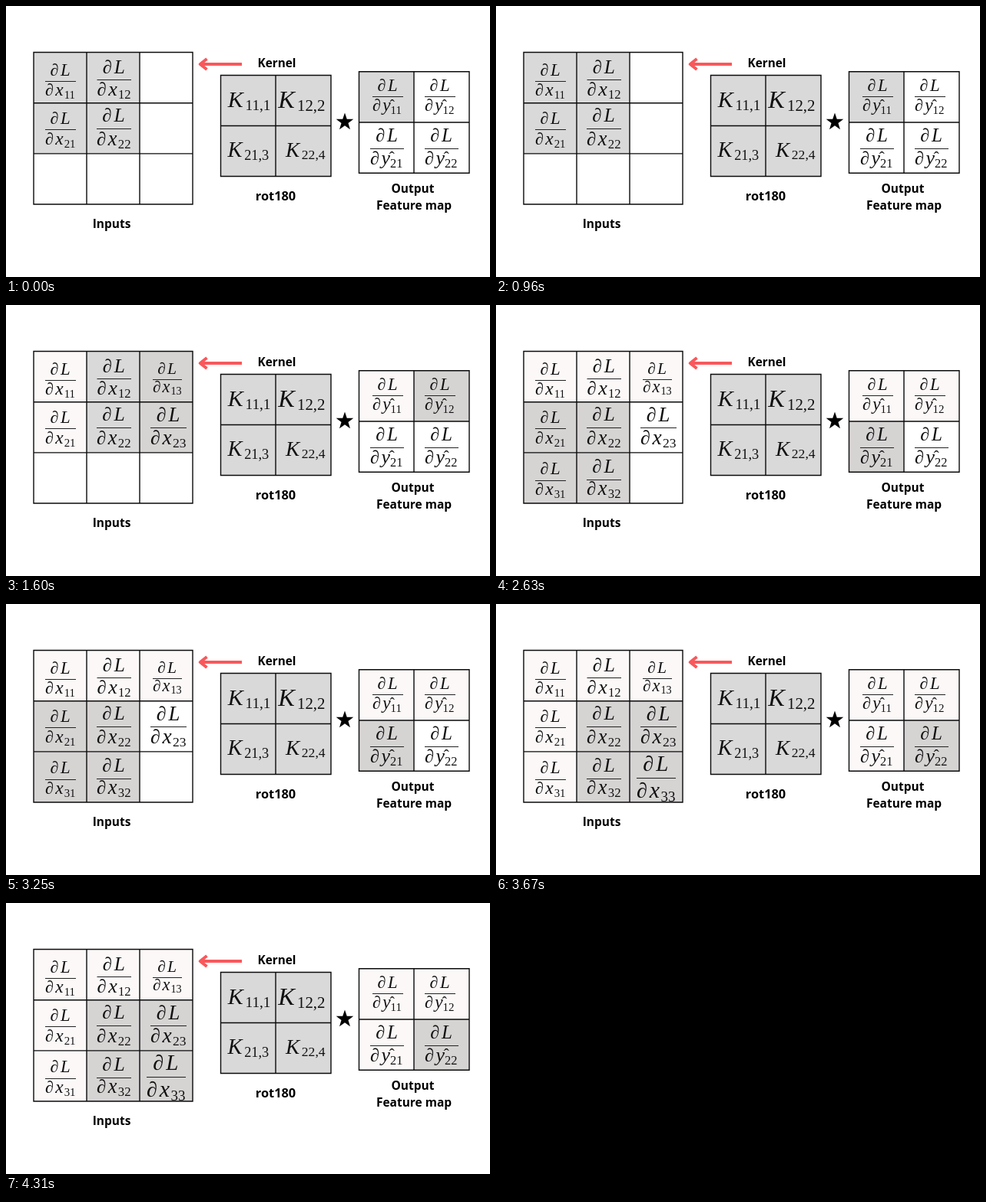
Write an HTML page that moves like this. It is 630 by 354 pixels and loops after 4730 ms.

```html
<!DOCTYPE html>
<html lang="en">
<head>
<meta charset="utf-8">
<title>Convolution gradient</title>
<style>
html, body { margin: 0; width: 100%; height: 100%; overflow: hidden; background: #fff; }
svg { display: block; width: 630px; height: 354px; }
.label { font-family: "Open Sans", "Noto Sans", sans-serif; font-weight: 700; text-anchor: middle; }
.it { font-family: "Liberation Serif", "Times New Roman", serif; font-style: italic; fill: #111; }
.up { font-family: "Liberation Serif", "Times New Roman", serif; fill: #111; }
</style>
</head>
<body>
<svg id="stage" viewBox="0 0 630 354"></svg>
<script>
const NS = 'http://www.w3.org/2000/svg';
const stage = document.getElementById('stage');
const LOOP = 4730;
const STARTS = [0, 1600, 2630, 3670];
const TONES = { w: '#ffffff', o: '#fcf8f8', g: '#d9d9d9', d: '#d6d3d3' };

// Cell tones per step, row by row
const INPUT_STEPS = ['ggwggwwww', 'ogdogdwww', 'oooddwddw', 'ooooddodd'];
const OUTPUT_STEPS = ['gwww', 'odww', 'oodw', 'oood'];

function add(parent, tag, attrs, text) {
  const el = document.createElementNS(NS, tag);
  for (const k in attrs) el.setAttribute(k, attrs[k]);
  if (text) el.textContent = text;
  parent.appendChild(el);
  return el;
}

const glyph = (parent, cls, x, y, size, text) =>
  add(parent, 'text', { class: cls, x, y, 'font-size': size }, text);

// Filled cells first, ruled lines on top
function grid(xs, ys) {
  const cells = [];
  for (let r = 0; r < ys.length - 1; r++)
    for (let c = 0; c < xs.length - 1; c++)
      cells.push(add(stage, 'rect', {
        x: xs[c], y: ys[r], width: xs[c + 1] - xs[c], height: ys[r + 1] - ys[r], fill: TONES.g
      }));
  const x1 = xs[xs.length - 1], y1 = ys[ys.length - 1];
  const d = xs.map(x => `M${x} ${ys[0]}V${y1}`).concat(ys.map(y => `M${xs[0]} ${y}H${x1}`)).join('');
  add(stage, 'path', { d, stroke: '#0a0a0a', 'stroke-width': 1.4, 'stroke-linecap': 'square', fill: 'none' });
  return cells;
}

// Partial derivative of L; the bar width sets the type size
function fraction(left, right, top, bar, bottom, name, sub) {
  const g = add(stage, 'g', {});
  const s = (right - left) / 1.88;
  const x = (left + right) / 2 - 0.635 * s;
  glyph(g, 'it', x, top, s * 1.04, '∂');
  glyph(g, 'it', x + 0.63 * s, top, s * 1.07, 'L');
  add(g, 'path', { d: `M${left} ${bar}H${right}`, stroke: '#222', 'stroke-width': 1 });
  glyph(g, 'it', left, bottom, s * 1.04, '∂');
  glyph(g, 'it', left + 0.62 * s, bottom, s * 1.1, name);
  const hat = name === 'y';
  if (hat) glyph(g, 'up', left + 1.06 * s, bottom - 0.1 * s, s * 0.9, 'ˆ');
  glyph(g, 'up', left + (hat ? 1.11 : 1.16) * s, bottom + 0.17 * s, s * 0.7, sub);
  return g;
}

function weight(x, y, s, sub) {
  glyph(stage, 'it', x + 0.06 * s, y, s * 1.1, 'K');
  glyph(stage, 'up', x + 0.9 * s, y + 0.16 * s, s * 0.71, sub);
}

function label(x, y, text, size = 15.5) {
  add(stage, 'text', { class: 'label', x, y, 'font-size': size }, text);
}

const inputs = grid([36, 105, 174, 243], [60.5, 126.7, 192.9, 259]);
grid([279.5, 351, 423], [90.5, 156.5, 222.5]);
const outputs = grid([459.5, 531, 603], [85.8, 152, 218.2]);

// left, right, numerator, bar, denominator, index, first step shown
const terms = [
  [51, 91, 91, 98.5, 117, '11', 0],
  [118.5, 163, 88, 96.5, 117, '12', 0],
  [191, 229, 89.5, 97.5, 114, '13', 1],
  [51, 91, 154, 161.5, 181, '21', 0],
  [118, 163, 151, 160.5, 182, '22', 0],
  [188, 235, 152, 160.5, 182, '23', 1],
  [51, 91, 221, 229.5, 248, '31', 2],
  [118, 163, 218.5, 228.5, 248, '32', 2],
  [183, 234, 218, 227.5, 253, '33', 3]
].map(([l, r, t, b, d, sub, from]) => ({ el: fraction(l, r, t, b, d, 'x', sub), from }));

[
  [477, 517, 111, 118.5, 137, '11'],
  [545, 585, 111, 118.5, 137, '12'],
  [474, 518, 177, 186.5, 207, '21'],
  [545, 589, 177, 186.5, 207, '22']
].forEach(([l, r, t, b, d, sub]) => fraction(l, r, t, b, d, 'y', sub));

weight(287, 132, 27.2, '11,1');
weight(352.5, 132.5, 29.4, '12,2');
weight(287, 196.5, 25.8, '21,3');
weight(362.5, 196.5, 24.8, '22,4');

label(352.5, 79.5, 'Kernel', 15.3);
label(351, 253.5, 'rot180', 16.4);
label(137.5, 290, 'Inputs');
label(529.5, 244, 'Output');
label(531, 266, 'Feature map');

add(stage, 'path', {
  d: 'M307 76H253M261.5 69L252.8 76L261.5 83',
  fill: 'none', stroke: '#f9585b', 'stroke-width': 4, 'stroke-linejoin': 'round'
});

const star = Array.from({ length: 10 }, (_, i) => {
  const r = i % 2 ? 4.7 : 11.9, a = i * Math.PI / 5;
  return `${441 + r * Math.sin(a)},${151.5 - r * Math.cos(a)}`;
});
add(stage, 'polygon', { points: star.join(' '), fill: '#000' });

let shown = -1;
function show(step) {
  if (step === shown) return;
  shown = step;
  inputs.forEach((c, i) => c.setAttribute('fill', TONES[INPUT_STEPS[step][i]]));
  outputs.forEach((c, i) => c.setAttribute('fill', TONES[OUTPUT_STEPS[step][i]]));
  terms.forEach(t => t.el.setAttribute('visibility', step >= t.from ? 'visible' : 'hidden'));
}

const begin = performance.now();
function tick() {
  const t = (performance.now() - begin) % LOOP;
  show(STARTS.filter(s => s <= t).length - 1);
  requestAnimationFrame(tick);
}
show(0);
requestAnimationFrame(tick);
</script>
</body>
</html>
```
